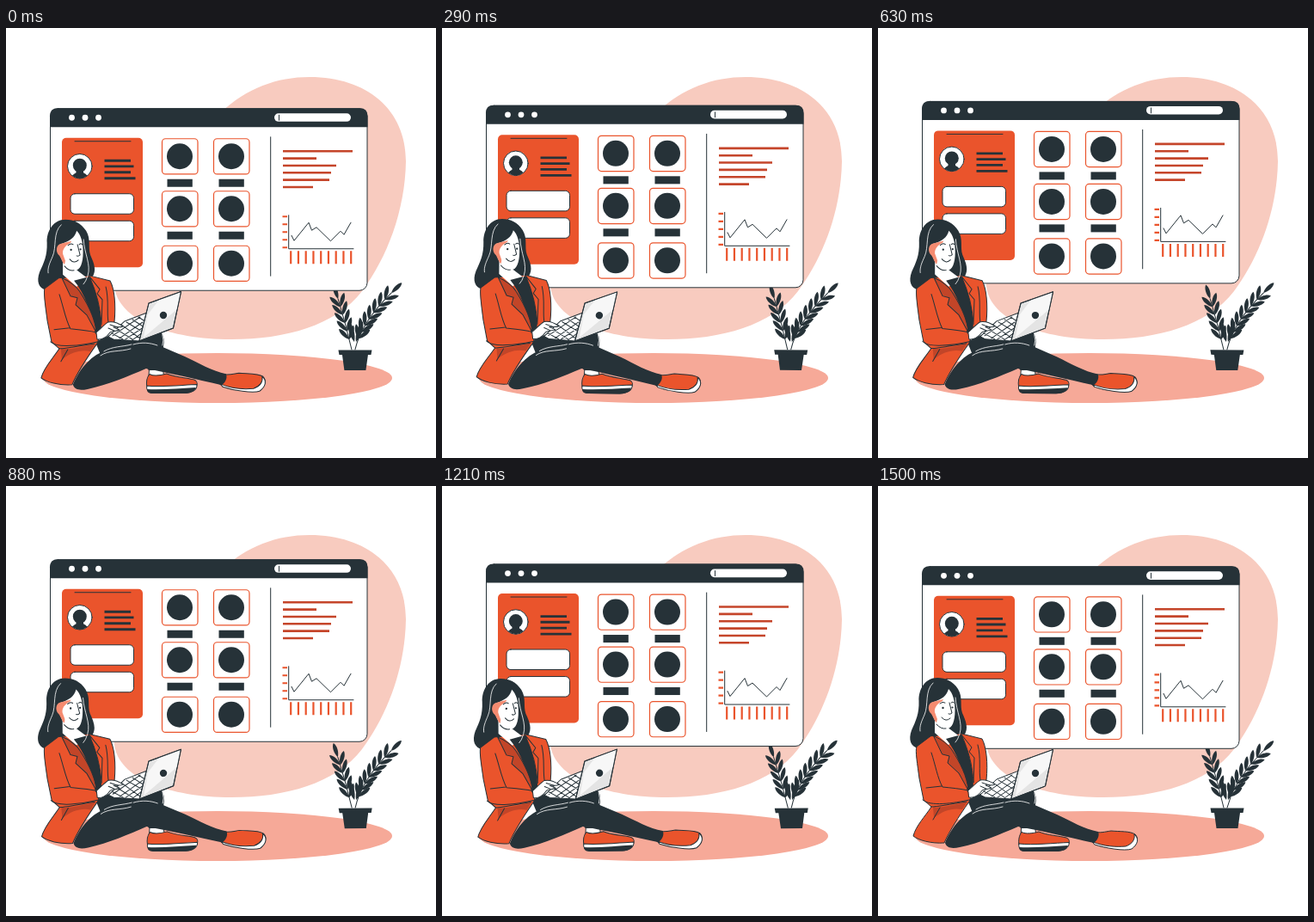
An HTML page for the animation above (1.54 s loop, 500 px wide and 500 px high).

```html
<!DOCTYPE html>
<html lang="en">
<head>
<meta charset="utf-8">
<title>Working with a laptop</title>
<style>
html, body { margin: 0; width: 100%; height: 100%; overflow: hidden; background: #fff; }
svg { display: block; width: 100%; height: 100%; }
.ink { fill: #263238; }
.red { fill: #ea542c; }
.deep { fill: #c24528; }
.white { fill: #fff; }
.line { stroke: #263238; stroke-width: 1; stroke-linejoin: round; stroke-linecap: round; }
.none { fill: none; }
.crease { fill: none; stroke: #fff; stroke-width: .8; stroke-linecap: round; }
</style>
</head>
<body>
<svg viewBox="0 0 500 500">
  <path fill="#f8cbbf" d="M353 57C420 57 465 95 465 155C464 213 443 267 414 306C383 346 325 362 262 362C190 362 130 340 126 300C122 240 215 150 250 98C280 70 315 57 353 57Z"/>
  <ellipse cx="246" cy="407" rx="203" ry="29" fill="#f6a998"/>

  <g id="plant">
    <g id="fronds"></g>
    <path class="ink" d="M386.500 374.500H425.500L424.500 380H421L418.500 398H393.500L391 380H387.500Z"/>
  </g>

  <g id="panel">
    <rect class="white line" x="51.500" y="93.500" width="368.500" height="211.500" rx="9"/>
    <path class="ink" d="M51 115V102Q51 93 60 93H411.500Q420.500 93 420.500 102V115Z"/>
    <g class="white">
      <circle cx="76.500" cy="104" r="3.400"/><circle cx="92" cy="104" r="3.400"/><circle cx="107.500" cy="104" r="3.400"/>
      <rect x="312" y="99" width="89" height="9.600" rx="4.800"/>
    </g>
    <path class="line" d="M317.500 101V107"/>

    <rect class="red" x="65" y="127.500" width="94" height="150.500" rx="5"/>
    <path class="line" d="M80 131.500H145"/>
    <circle class="white line" cx="85.800" cy="160.500" r="14.300"/>
    <circle class="ink" cx="85.800" cy="159.500" r="8"/>
    <path class="ink" d="M81.500 164H90V168Q93 169 94.500 171.500Q86 178 77 171.500Q79 169 81.500 168Z"/>
    <path fill="none" stroke="#263238" stroke-width="2.800" d="M114.500 154H145M114.500 160.700H148.500M114.500 167.500H145M114.500 174.500H150.500"/>
    <rect class="white line" x="75" y="192.500" width="73.500" height="23.500" rx="5"/>
    <rect class="white line" x="75" y="224" width="73.500" height="23.500" rx="5"/>

    <g id="cards"></g>
    <path class="line" d="M307.700 126.500V288"/>
    <path id="bars" fill="none" stroke="#c5452a" stroke-width="2.600"/>
    <path id="ticks" fill="none" stroke="#ea542c" stroke-width="2.200"/>
    <path class="line none" d="M328.700 217.500V256.500H404"/>
    <path class="line none" d="M332 241L335 247L352 226L355.500 235L361 231.500L377.500 247.500L389 236L393 240L401 226"/>
  </g>

  <g id="woman">
    <!-- far shoe -->
    <path class="white line" d="M167 392L166 406L184 406L182 394Z"/>
    <path class="red line" d="M167 402.500C172 405 180 404 187 402C196 406 212 407 219 409C222 410 223 413 222 416L164 418C163 412 164 406 167 402.500Z"/>
    <path class="white line" d="M164 416C180 418 206 415 222 414.500C223 421 216 424 208 424.500L171 424.500C165 424 163 420 164 416Z"/>
    <path class="ink" d="M164 420C181 421 202 419 221 418C220 423 214 425 207 425H171C166 425 164 423 164 420Z"/>

    <!-- legs and near shoe -->
    <path class="ink" d="M104 365L125 355H181Q185 360 183 371L183 398L166 398L160 390L110 380Z"/>
    <path class="red line" d="M251 402C258 404 264 402 271 401C281 402 293 401 299 405C304 410 301 417 294 422L271 421C262 420 253 418 249 414Z"/>
    <path class="white line" d="M250 414C262 419 277 420 288 419C296 416 299 411 298 405C304 410 302 417 295 422C287 425 264 421 252 417Z"/>
    <path class="ink" d="M78 415C86 395 101 379 117 375C139 368 162 364 180 370L208 382C225 390 240 399 256 402C258 407 255 412 251 415C220 408 190 401 163 396C142 405 119 415 95 420C86 422 80 421 78 415Z"/>
    <path class="crease" d="M110 381C120 374 132 377 145 373M114 376C124 370 135 371 146 368M148 368C158 365 168 366 176 369M182 357Q184 363 182 369"/>

    <!-- hair -->
    <path class="ink" d="M69 223C55 223 47 236 47.500 250C48 265 44 273 39 284C35 295 38 303 47 305C62 302 91 304 100 290C106 282 102 273 98 264C95 255 99 246 93 236C87 227 79 223 69 223Z"/>

    <!-- jacket -->
    <path class="red line" d="M61 291L45 303C43 308 46 324 48 340L53 365L62 373C55 384 44 395 41 407C47 412 62 416 77 415C82 403 94 384 106 367L112 350L126 342C128 322 126 303 121 294L97 288Z"/>
    <path class="deep" d="M64 373C72 375 88 371 104 367L98 376C87 374 76 377 65 386Z"/>
    <path class="line none" d="M62 373C69 373 84 370 103 367M72 374L64 388M116 301C120 316 117 331 119 342"/>
    <path class="white" d="M66 269V287L82 301L96 292L80 280Z"/>
    <path class="ink" d="M79 294L97 289C105 305 111 330 111 352L104 356C100 332 91 308 79 294Z"/>
    <path class="deep line" d="M65 291C74 294 83 302 86 307C95 321 104 338 105 354L94 334L81 322L83 314L75 312Z"/>
    <path class="red line" d="M97 289L109 304L106 309L112 316L111 345C110 325 105 307 97 289Z"/>
    <path class="line none" d="M62 310C67 325 69 339 75 350C85 351 96 352 105 354M52 365C60 373 88 369 106 365M56 351L74 349"/>

    <!-- laptop -->
    <path class="white line" d="M119 359L138 341L164 331L155 364L125 362Z"/>
    <path class="line none" d="M124 358L156 336M132 361L159 342M139 362L160 348M147 363L159 354M134 345L156 361M140 342L160 354M147 339L161 348M154 336L163 342M128 350L147 362M123 355L136 362" stroke-width=".8"/>
    <path class="line" fill="#e4e4e4" d="M166 320L203.500 306.500L194.500 349L155 364Z"/>
    <path fill="#f7f7f7" d="M178 316L203 307L199 327L160 360L165 333Z"/>
    <path class="line none" d="M166 320L203.500 306.500L194.500 349L155 364Z"/>
    <circle class="ink" cx="183" cy="334" r="4.200"/>

    <!-- hand -->
    <path class="white line" d="M105 354C110 350 114 345 119 342C125 341 132 344 136 347C132 349 128 347 125 348L132 351C128 353 123 352 121 354C117 360 111 363 106 362Z"/>
    <path class="line none" d="M121 345L130 348M119 349L126 352"/>

    <!-- face -->
    <path class="white" d="M82 236C87 241 89.500 249 89.500 261C89.500 274 86 283 79 282C72 281 66 275 63 265C58 262 58 252 65 251C74 248 80 244 82 236Z"/>
    <path fill="#f58b70" d="M64 251C58 252 57 261 62 265C65 270 66 274 68 275C70 268 70 258 76 248C72 249 68 250 64 251Z"/>
    <path class="white" d="M66 263C65 258 69 253 75 250L80 263L78 276L70 274Z"/>
    <path class="line none" d="M83 252Q85 260 86 264Q84 266 82 265M74 269Q79 275 84 270M72 253Q75 250 78 252M85 252Q87 250 88.500 252M68 277Q73 283 79 282"/>
    <circle class="ink" cx="75.500" cy="258" r="1.200"/><circle class="ink" cx="86.500" cy="257.500" r="1.100"/>
    <path class="crease" d="M64 229C54 238 59 255 54 266C51 273 48 279 49 285M90 246C91 263 99 275 95 288Q93 295 90 298"/>
  </g>
</svg>
<script>
const LOOP = 1540, FPS = 24, TAU = Math.PI * 2;
const el = id => document.getElementById(id);

const hline = (x1, x2, y) => `M${x1} ${y}H${x2}`;
const vline = (x, y1, y2) => `M${x} ${y1}V${y2}`;

// Icon cards, two per row
const card = (x, y, label) =>
  `<rect x="${x - 20.5}" y="${y - 20.5}" width="41.5" height="41.2" rx="4" fill="#fff" stroke="#ea542c" stroke-width="1.2"/>` +
  `<circle class="ink" cx="${x}" cy="${y}" r="15"/>` +
  (label ? `<rect class="ink" x="${x - 14.5}" y="${y + 26.5}" width="29.3" height="9"/>` : '');
el('cards').innerHTML = [149, 210, 273.5]
  .map((y, row) => [202, 262].map(x => card(x, y, row < 2)).join('')).join('');

el('bars').setAttribute('d',
  [403, 361, 384, 378, 376, 357].map((x, i) => hline(322, x, 143 + i * 8.35)).join(''));

let ticks = '';
for (let i = 0; i < 5; i++) ticks += hline(321.5, 327, 219 + i * 9);
for (let i = 0; i < 9; i++) ticks += vline(331.2 + i * 8.75, 259, 274);
el('ticks').setAttribute('d', ticks);

// Fronds: leaves set in pairs along a quadratic curve
const leaf = (x, y, deg, len, wide) =>
  `<path class="ink" transform="translate(${x} ${y}) rotate(${deg})" ` +
  `d="M0 0C${len * .3} ${-wide} ${len * .8} ${-wide} ${len} 0C${len * .8} ${wide} ${len * .3} ${wide} 0 0Z"/>`;

function frond(a, b, c, pairs, len, wide) {
  let out = `<path class="line none" d="M${a}Q${b} ${c}"/>`;
  const at = (t, k) => (1 - t) ** 2 * a[k] + 2 * t * (1 - t) * b[k] + t * t * c[k];
  const slope = (t, k) => 2 * (1 - t) * (b[k] - a[k]) + 2 * t * (c[k] - b[k]);
  for (let i = 0; i <= pairs; i++) {
    const t = .2 + .8 * i / pairs;
    const deg = Math.atan2(slope(t, 1), slope(t, 0)) * 360 / TAU;
    const sides = i === pairs ? [0] : [-31, 31];
    for (const s of sides) out += leaf(at(t, 0), at(t, 1), deg + s, len, wide);
  }
  return out;
}
el('fronds').innerHTML =
  frond([402, 374], [395, 344], [386, 315], 5, 17, 3.2) +
  frond([406, 374], [413, 342], [448, 308], 7, 17, 3.2) +
  leaf(405, 365, -105, 25, 4) + leaf(407, 365, -72, 25, 4);

function draw(ms) {
  const step = Math.floor((ms % LOOP + 4) * FPS / 1000);
  const phase = TAU * (step + 1) / 37;
  const lift = .3 - 4.4 * (1 - Math.cos(phase));
  const tilt = .6 * Math.sin(phase);
  el('panel').setAttribute('transform', `translate(0 ${lift})`);
  el('woman').setAttribute('transform', `rotate(${tilt} 165 324)`);
  el('plant').setAttribute('transform', `rotate(${tilt} 418 347)`);
}

const start = performance.now();
function tick() {
  draw(performance.now() - start);
  requestAnimationFrame(tick);
}
draw(0);
requestAnimationFrame(tick);
</script>
</body>
</html>
```
